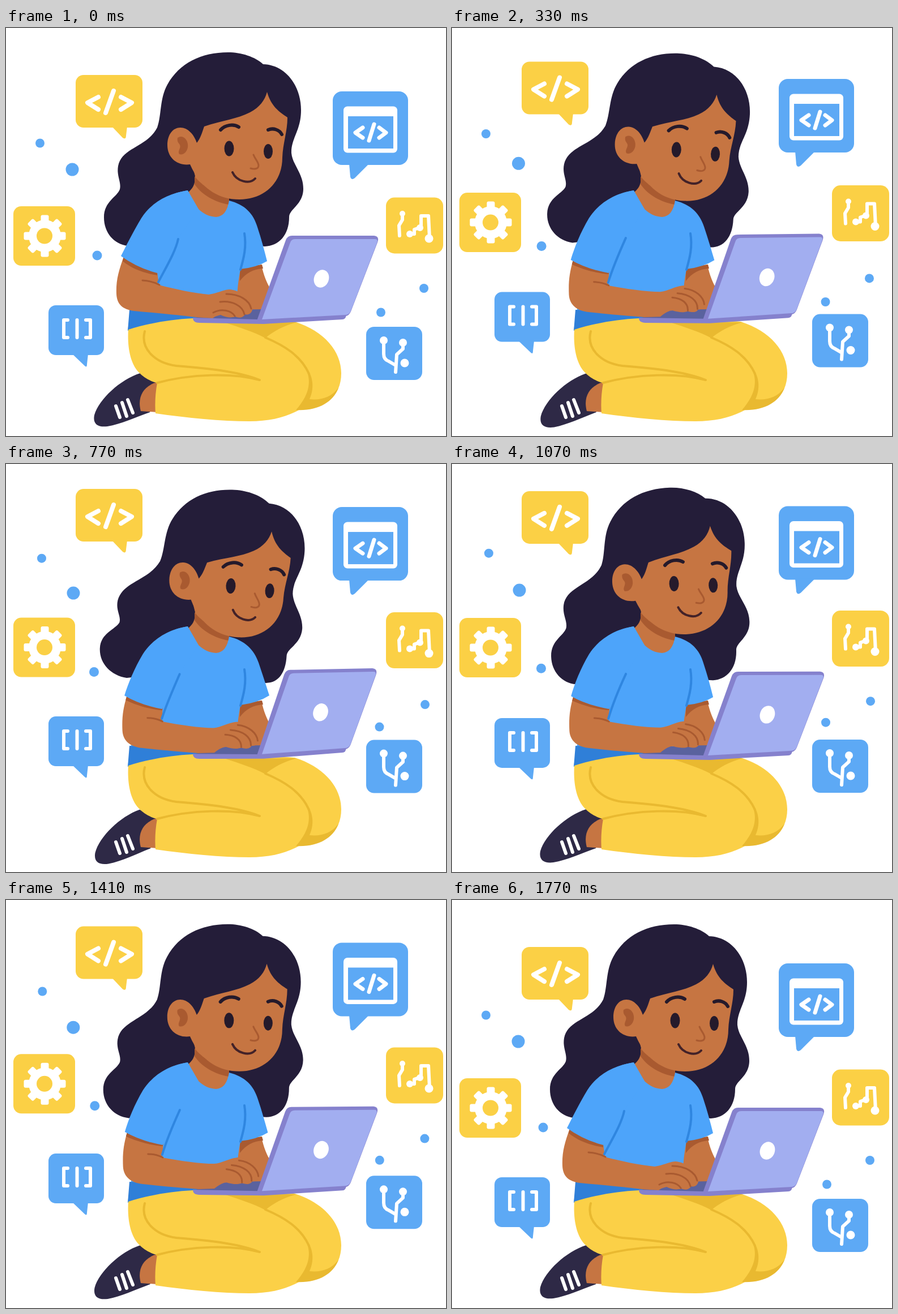
Recreate the animation shown at these times as an HTML page. Size 777 px wide and 721 px high, loop 1.8 s.

```html
<!DOCTYPE html>
<html lang="en">
<head>
<meta charset="utf-8">
<title>Girl coding on a laptop</title>
<style>
html, body { margin: 0; width: 100%; height: 100%; overflow: hidden; background: #fff; }
svg { display: block; }
.line { fill: none; stroke-linecap: round; stroke-linejoin: round; }
.hair { fill: #241d39; }
.skin { fill: #c67542; }
.shade { fill: #a95a30; }
.crease { stroke: #a95a30; stroke-width: 3; }
.shirt { fill: #4da4fa; }
.fold { stroke: #2f86e0; stroke-width: 4; }
.pants { fill: #fbd047; }
.dark { fill: #e9b930; }
.seam { stroke: #e9b930; stroke-width: 4; }
.edge { fill: #8581cd; }
.ink { stroke: #251a2b; stroke-width: 6; }
.blue { fill: #5da9f5; }
.gold { fill: #fbd045; }
.white { fill: #fff; }
.icon { stroke: #fff; }
</style>
</head>
<body>
<svg width="777" height="721" viewBox="0 0 777 721">
  <!-- hair behind the body -->
  <g class="head">
    <path class="hair" data-by="tilt" data-to="M392 43C416 43 440 51 454 64C493 65 521 101 521 145C521 182 503 195 504 221C506 242 524 257 524 282C523 310 499 317 499 331C499 361 487 381 463 381L300 372L219 385C190 382 169 361 169 335C169 308 194 301 201 288C204 277 193 267 196 249C203 215 249 211 267 176C275 154 271 125 285 100C306 62 345 43 392 43Z"
      d="M392 43C416 43 440 51 454 64C493 65 521 101 521 145C521 182 503 195 504 221C506 242 525 257 525 284C525 312 500 320 500 334C500 366 482 385 457 386L300 372L215 385C190 382 173 361 173 335C173 306 196 299 201 285C204 272 195 262 198 244C204 211 249 211 267 176C275 154 271 125 285 100C306 62 345 43 392 43Z"/>
  </g>

  <!-- far arm, neck and torso -->
  <path class="skin" d="M412 424L451 418C455 438 461 451 467 461L448 504H400Z"/>
  <path class="shade" d="M413 425L452 418L454 425C436 426 424 433 413 447Z"/>
  <path class="skin" d="M326 230L334 262C334 278 329 284 322 290L345 338L385 338L394 312V270Z"/>
  <path class="shade" d="M333 262C345 278 370 294 394 298V312C368 308 345 294 333 276Z"/>
  <path class="shirt" data-by="tilt" data-to="M321 287C330 315 348 333 371 334C384 333 391 323 394 305C422 312 438 328 446 351C453 372 459 390 465 409Q445 422 414 426C411 445 408 458 408 490L330 520L215 534L222 490L265 400L245 332C268 304 292 291 321 287Z"
    d="M321 287C330 315 348 333 371 334C384 333 391 323 394 305C422 312 437 328 444 352C451 373 456 392 461 412Q443 423 414 426C411 445 408 458 408 490L330 520L215 534L222 490L265 400L245 332C268 304 292 291 321 287Z"/>
  <path fill="#2f7fd8" d="M218 498L340 503V514Q270 516 215 535Z"/>
  <path class="line fold" d="M421 363C425 387 420 406 414 427"/>

  <!-- legs and shoe -->
  <path id="shoe" fill="#2e2946" d="M237 610C202 621 164 656 156 684C153 699 161 706 179 704C203 700 226 689 254 679L266 626Z"/>
  <path class="line icon" stroke-width="6" d="M194 668L201 688M205 662L213 686M215 657L224 680"/>
  <path class="skin" d="M270 625C244 631 231 650 238 677L268 679Z"/>
  <path class="pants" d="M216 533C214 562 219 592 234 608C244 619 257 625 267 627Q262 655 264 681C320 689 380 695 430 695C468 695 497 687 519 674C562 674 592 652 592 610C592 572 563 536 510 519C470 515 400 515 330 513C290 515 250 522 216 533Z"/>
  <path class="dark" d="M388 521L514 520C492 525 472 536 458 548C438 537 412 529 388 521Z"/>
  <path class="dark" d="M524 593C541 617 539 645 512 675C550 677 577 662 587 636C574 653 556 658 536 656C546 634 542 610 524 593Z"/>
  <path class="line seam" d="M458 547C491 561 521 579 535 611M245 536C237 566 262 592 301 597C352 601 407 606 448 622C400 609 327 611 267 627"/>

  <!-- near arm and sleeve -->
  <path fill="#5a629e" d="M330 514L370 499L452 497L447 516Z"/>
  <path class="skin" data-to="M214 411C208 432 206 447 207 471C208 490 222 500 242 502C285 507 315 509 340 511L368 510C378 502 384 499 390 499C400 502 410 503 417 500C425 503 433 502 435 497C443 497 448 493 447 486C444 468 423 454 408 455C395 456 381 465 368 466C343 466 308 461 276 455L278 430Z"
    d="M208 404C199 429 194 446 195 470C196 489 206 497 226 500C270 504 310 508 335 511L365 513C368 510 372 509 379 507C388 511 396 513 405 510C412 513 419 512 422 506C430 508 436 502 435 494C432 477 412 463 394 462C383 463 372 469 358 471C330 468 300 462 270 454L267 431Z"/>
  <path class="shade" data-to="M214 411L278 429L277 435C252 433 230 426 212 418Z" d="M208 402L267 430L267 437C242 433 222 425 206 412Z"/>
  <path class="line crease" data-to="M251 449Q265 449 277 455M390 475C407 477 418 485 417 499M399 468C421 470 435 481 434 496M412 460C431 462 445 475 446 488" d="M241 446Q258 447 271 454M366 503C380 495 398 499 404 509M378 484C399 481 418 491 421 506M389 470C412 470 430 481 433 496"/>
  <path class="shirt" data-to="M321 287C288 293 261 307 242 336C227 361 216 389 210 410Q238 426 277 433L307 370L340 320Z" d="M321 287C285 293 258 307 239 336C224 361 212 385 203 403Q232 424 267 433L304 372L340 320Z"/>
  <path class="line fold" data-to="M307 371C296 395 284 423 276 450" d="M304 373C300 394 282 424 269 449"/>

  <!-- face -->
  <g class="head">
    <path class="skin" d="M461 113C468 138 482 148 497 158C497 183 489 203 488 229C488 273 456 303 412 303C372 303 342 280 325 241C302 244 285 229 285 207C285 188 295 176 308 176C321 176 332 188 337 203C344 194 346 185 350 174C382 163 408 161 431 149C448 140 457 128 461 113Z"/>
    <path class="shade" d="M303 194C313 187 323 199 321 211C319 220 313 225 306 223C302 217 311 211 306 205C303 202 302 198 303 194Z"/>
    <path class="line ink" d="M379 180C387 171 402 169 411 175M463 180C472 176 483 180 487 188"/>
    <ellipse cx="394" cy="213" rx="8.5" ry="13.5" fill="#251a2b"/>
    <ellipse cx="463" cy="218" rx="8" ry="13" fill="#251a2b"/>
    <path class="line crease" d="M437 224C440 232 446 237 446 243C446 249 439 250 432 248"/>
    <path class="line" stroke="#432228" stroke-width="4" d="M400 255C407 271 430 277 440 266"/>
  </g>

  <g id="laptop">
    <path class="edge" d="M330 512L445 515L601 507Q600 515 594 515L455 523L342 521Q330 521 330 512Z"/>
    <path class="edge" d="M505 367H650Q660 368 656 379L609 501Q606 508 600 509L443 517L494 375Q497 367 505 367Z"/>
    <path fill="#a2aef0" d="M511 373H650Q658 372 655 380L609 500Q606 507 599 507L452 515L502 379Q504 373 511 373Z"/>
    <ellipse class="white" cx="557" cy="443" rx="13" ry="16" transform="rotate(20 557 443)"/>
  </g>

  <g id="code">
    <rect class="gold" x="123" y="83" width="118" height="93" rx="14"/>
    <path class="gold" d="M187 174L206 194Q212 198 212 190L214 174Z"/>
    <path class="line icon" stroke-width="8" d="M163 122L144 132L163 144M190 111L176 150M203 122L222 132L203 144"/>
  </g>
  <g id="window">
    <rect class="blue" x="577" y="112" width="133" height="130" rx="16"/>
    <path class="blue" d="M606 240L608 263Q610 270 616 265L641 240Z"/>
    <rect class="white" x="596" y="138.500" width="95" height="82" rx="7"/>
    <rect class="blue" x="604" y="156" width="80" height="57"/>
    <path class="line icon" stroke-width="7" d="M630 176L617 185L630 194M650 170L641 199M659 176L671 185L659 194"/>
  </g>
  <g id="gear">
    <rect class="gold" x="13" y="315" width="109" height="105" rx="14"/>
    <g id="teeth" class="white" transform="translate(68.5 367.5)"><circle r="28.5"/></g>
    <circle class="gold" cx="68" cy="367.5" r="14"/>
  </g>
  <g id="bracket">
    <rect class="blue" x="75" y="490" width="98" height="88" rx="13"/>
    <path class="blue" d="M117 576L139 597Q143 601 143 594L145 576Z"/>
    <path class="line icon" stroke-width="6" d="M109 516H102V547H109M125.500 516V547M141 516H149V547H141"/>
  </g>
  <g id="circuit">
    <rect class="gold" x="671" y="299.500" width="101" height="99" rx="15"/>
    <path class="line icon" stroke-width="6" d="M700 328V339L694 349L695 367M713 364H721V356L733 352V332H746L748 372"/>
    <g class="white"><circle cx="700" cy="328" r="5"/><circle cx="713" cy="364" r="6"/><circle cx="731" cy="353" r="6"/><circle cx="747" cy="372" r="7.500"/></g>
  </g>
  <g id="branch">
    <rect class="blue" x="636" y="528" width="99" height="94" rx="14"/>
    <path class="line icon" stroke-width="6" d="M667 552V576Q667 586 676 589L688 596M701 556V567L690 577L688 608"/>
    <g class="white"><circle cx="667" cy="552" r="7"/><circle cx="701" cy="556" r="7"/><circle cx="704" cy="592" r="7.500"/></g>
  </g>
  <g class="blue">
    <circle id="dot1" cx="60" cy="203.500" r="8"/>
    <circle id="dot2" cx="117" cy="250" r="11.500"/>
    <circle id="dot3" cx="161" cy="402" r="8.500"/>
    <circle id="dot4" cx="738" cy="460" r="8"/>
    <circle id="dot5" cx="662" cy="502.500" r="8"/>
  </g>
</svg>
<script>
const LOOP = 1800;
const TIMES = [0, 330, 770, 1070, 1270, 1570];
const RETURN = 1620, HOME = 1770;

// Runs of evenly spaced picture changes: start, end, count
const STEPS = [0];
for (const [from, to, n] of [[70, 570, 13], [600, 1100, 13], [1140, 1610, 12], [1670, 1770, 3]])
  for (let i = 0; i < n; i++) STEPS.push(from + (to - from) * i / (n - 1));

// Smooth curve through the poses, then a quick straight return to rest
function track([a, b, c, d], t) {
  const v = [0, a, b, c, c, d];
  if (t >= 1570) return d * (1 - Math.max(0, t - RETURN) / (HOME - RETURN));
  const i = TIMES.findLastIndex(k => k <= t);
  const slope = j => {
    const p = Math.max(j - 1, 0), q = Math.min(j + 1, 5);
    return (v[q] - v[p]) / (TIMES[q] - TIMES[p]);
  };
  const h = TIMES[i + 1] - TIMES[i], u = (t - TIMES[i]) / h, w = 1 - u;
  return w * w * (1 + 2 * u) * v[i] + u * u * (3 - 2 * u) * v[i + 1]
    + u * w * h * (w * slope(i) - u * slope(i + 1));
}

const STILL = [0, 0, 0, 0];
const FLOATS = {
  code: [STILL, [-24, -39, -35, -39]],
  window: [STILL, [-22.5, -36, -37.5, -35]],
  gear: [STILL, [-24.5, -43.5, -43, -42]],
  bracket: [STILL, [-24, -44, -41, -43.5]],
  circuit: [STILL, [-22, -37.5, -40.5, -36.5]],
  branch: [STILL, [-23, -40.5, -41, -40]],
  dot1: [[0, 3, 5, 3], [-17, -37, -46, -35]],
  dot2: [[.5, 2, 2, 1.5], [-11, -22, -27, -21]],
  dot3: [[-3, -5.5, -3.5, -5.5], [-17, -34.5, -41, -33.5]],
  dot4: [[-1, 2, 1, 2], [-18, -35, -41, -34]],
  dot5: [[-2.5, -2.5, -2, -2.5], [-19, -38, -46, -37]]
};

const byId = id => document.getElementById(id);
const place = (el, value) => el.setAttribute("transform", value);
const heads = document.querySelectorAll(".head");
const NUM = /-?[\d.]+/g;
const morphs = [...document.querySelectorAll("[data-to]")].map(el => ({
  el, from: el.getAttribute("d"), to: el.dataset.to.match(NUM), by: el.dataset.by || "arm"
}));

for (let i = 0; i < 4; i++)
  byId("teeth").innerHTML += `<rect x="-7" y="-37" width="14" height="74" rx="3" transform="rotate(${i * 45})"/>`;

function draw(now) {
  const t = STEPS.findLast(s => s <= now % LOOP);
  const turn = track([2.4, 3, -2, 3], t);
  const pose = {
    arm: track([.97, .88, 1.03, .88], t),
    tilt: track([.6, 1, 0, 1], t)
  };
  heads.forEach(el => place(el, `rotate(${turn} 348 270)`));
  place(byId("laptop"), `rotate(${-1.1 * pose.tilt} 340 517)`);
  place(byId("shoe"), `rotate(${-1.8 * pose.tilt} 260 640)`);
  for (const { el, from, to, by } of morphs) {
    let i = 0;
    el.setAttribute("d", from.replace(NUM, n => (+n + (to[i++] - n) * pose[by]).toFixed(2)));
  }
  for (const id in FLOATS) {
    const [x, y] = FLOATS[id].map(f => track(f, t));
    place(byId(id), `translate(${x} ${y})`);
  }
}

const start = performance.now();
function tick() {
  draw(performance.now() - start);
  requestAnimationFrame(tick);
}
tick();
</script>
</body>
</html>
```
